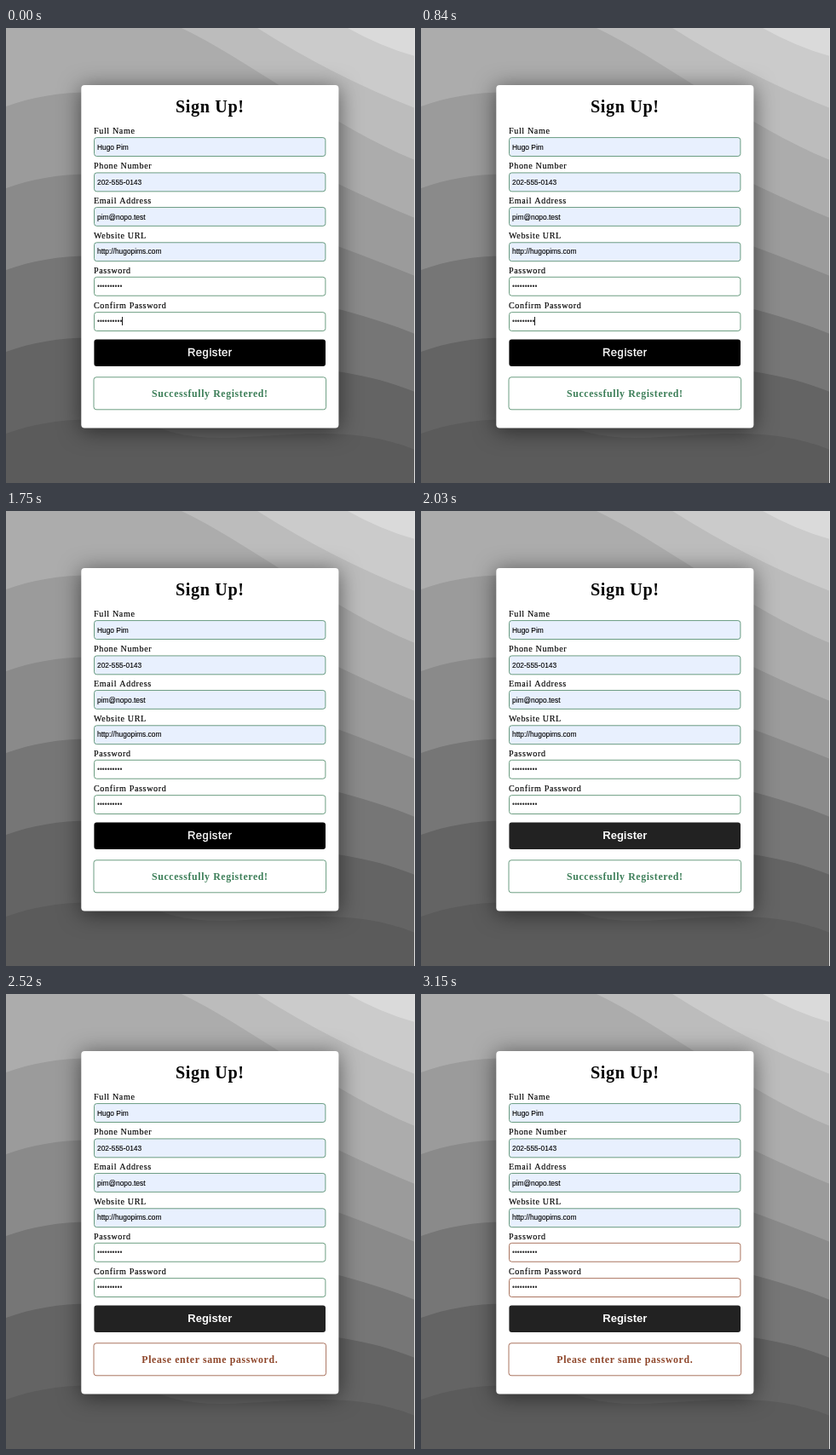
An HTML page with a canvas for the animation above (3.22 s loop, 480x534 px).

```html
<!DOCTYPE html>
<html lang="en">
<head>
<meta charset="utf-8">
<title>Sign Up</title>
<style>
  html, body { margin: 0; width: 100%; height: 100%; overflow: hidden; background: #5b5b5b; }
  canvas { display: block; width: 480px; height: 534px; }
</style>
</head>
<body>
<canvas id="stage"></canvas>
<script>
const W = 480, H = 534, LOOP = 3220, STEP = 70;
const SERIF = '"Liberation Serif", "Times New Roman", serif';
const SANS = '"Liberation Sans", Arial, sans-serif';
const GREEN = [60, 126, 88], BROWN = [142, 70, 42];
const SPACING = 0.63;
const FIELD = { x: 103.5, y: 128.6, w: 271.4, h: 21.9, pitch: 40.93 };
const FIELDS = [
  ['Full Name', 'Hugo Pim'],
  ['Phone Number', '202-555-0143'],
  ['Email Address', 'pim@nopo.test'],
  ['Website URL', 'http://hugopims.com'],
  ['Password'],
  ['Confirm Password']
];
const CONFIRM = 5;
const WAVE_SHADES = [172, 155, 138, 118, 100, 91];

const canvas = document.getElementById('stage');
const ctx = canvas.getContext('2d');
const dpr = window.devicePixelRatio || 1;
canvas.width = W * dpr;
canvas.height = H * dpr;
ctx.scale(dpr, dpr);

const rgb = (c, a = 1) => `rgba(${c.map(Math.round).join(',')},${a})`;
const mix = (a, b, k) => a.map((v, i) => v + (b[i] - v) * k);
const gray = v => rgb([v, v, v]);
const between = (t, a, b) => t >= a && t < b;

// `weight` is a thin outline that thickens the strokes of the letters.
function text(str, x, y, font, color, { spacing = 0, align = 'left', weight = 0 } = {}) {
  ctx.font = font;
  ctx.fillStyle = ctx.strokeStyle = color;
  ctx.letterSpacing = spacing + 'px';
  ctx.textAlign = align;
  ctx.fillText(str, x, y);
  if (!weight) return;
  ctx.lineWidth = weight;
  ctx.lineJoin = 'round';
  ctx.strokeText(str, x, y);
}

function box(x, y, w, h, r, fill, stroke) {
  ctx.beginPath();
  ctx.roundRect(x, y, w, h, r);
  ctx.fillStyle = fill;
  ctx.fill();
  if (!stroke) return;
  ctx.strokeStyle = stroke;
  ctx.lineWidth = 1;
  ctx.stroke();
}

// Closes the current path around the lower left of the stage.
function fillBelow(shade) {
  ctx.lineTo(W, H);
  ctx.lineTo(0, H);
  ctx.lineTo(0, 0);
  ctx.fillStyle = gray(shade);
  ctx.fill();
}

function slope(x, cx, cy, right, shade) {
  ctx.beginPath();
  ctx.moveTo(x, 0);
  ctx.quadraticCurveTo(cx, cy, W, right);
  fillBelow(shade);
}

function wave(left, right, shade) {
  ctx.beginPath();
  ctx.moveTo(0, left);
  ctx.bezierCurveTo(55, left - 20, 120, left - 22, 185, left - 5);
  ctx.bezierCurveTo(262, left + 24, 374, right - 43, W, right);
  ctx.lineTo(W, H);
  ctx.lineTo(0, H);
  ctx.fillStyle = gray(shade);
  ctx.fill();
}

function drawBackground() {
  ctx.fillStyle = gray(218);
  ctx.fillRect(0, 0, W, H);
  slope(401, 440, 22, 33, 203);
  slope(295, 385, 57, 94, 188);
  WAVE_SHADES.forEach((shade, k) => wave(96 * k - 4, 68 * k + 155, shade));
  ctx.fillStyle = gray(225);
  ctx.fillRect(W - 1, 0, 1, H);
}

function drawCard() {
  ctx.save();
  ctx.shadowColor = 'rgba(0,0,0,.55)';
  ctx.shadowBlur = 26 * dpr;
  ctx.shadowOffsetY = 3 * dpr;
  box(88.3, 67.1, 302.1, 402.4, 4, '#fff');
  ctx.restore();
  text('Sign Up!', 239.3, 98.6, `bold 20.16px ${SERIF}`, '#000', { spacing: SPACING, align: 'center' });
}

function drawField(i, dots, border) {
  const [label, value] = FIELDS[i];
  const dy = i * FIELD.pitch;
  const y = FIELD.y + dy + (i % 2) * 0.4;
  text(label, 103, 124 + dy, `10.08px ${SERIF}`, '#000', { spacing: SPACING, weight: 0.15 });
  box(FIELD.x, y, FIELD.w, FIELD.h, 3, value ? '#e8f0fe' : '#fff', rgb(border, 0.75));
  if (value) text(value, 107, 142.7 + dy, `8.4px ${SANS}`, '#000', { weight: 0.12 });
  else text('•'.repeat(dots), 107, 142.5 + dy, `8.4px ${SANS}`, '#333');
}

function drawCaret(dots) {
  ctx.fillStyle = '#000';
  ctx.fillRect(106.6 + dots * 2.94, 339, 0.9, 10);
}

function drawButton(hover) {
  const font = `${hover ? 'bold ' : ''}13px ${SANS}`;
  const style = hover ? { align: 'center' } : { align: 'center', spacing: 0.55, weight: 0.35 };
  box(103.4, 365.6, 271.6, 31.3, 3, hover ? '#222' : '#000');
  text('Register', 239.3, 385.4, font, '#fff', style);
}

function drawMessage(failed) {
  const color = failed ? BROWN : GREEN;
  box(103, 409.8, 272.6, 38, 3, '#fff', rgb(color, 0.75));
  text(failed ? 'Please enter same password.' : 'Successfully Registered!',
    239.3, 433, `bold 11.8px ${SERIF}`, rgb(color), { spacing: SPACING, align: 'center' });
}

function draw(now) {
  const t = Math.floor((now % LOOP) / STEP) * STEP;
  const dots = between(t, 490, 1260) ? 9 : 10;
  const caret = t < 350 || between(t, 840, 1750) || between(t, 2240, 2310);
  const fade = Math.min(1, Math.max(0, (t - 2520) / 280));
  const alert = mix(GREEN, BROWN, fade * fade * (3 - 2 * fade));

  drawBackground();
  drawCard();
  FIELDS.forEach(([, value], i) => drawField(i, i === CONFIRM ? dots : 10, value ? GREEN : alert));
  if (caret) drawCaret(dots);
  drawButton(t >= 2030);
  drawMessage(t >= 2520);
}

const start = performance.now();
function tick() {
  draw(performance.now() - start);
  requestAnimationFrame(tick);
}
tick();
</script>
</body>
</html>
```
